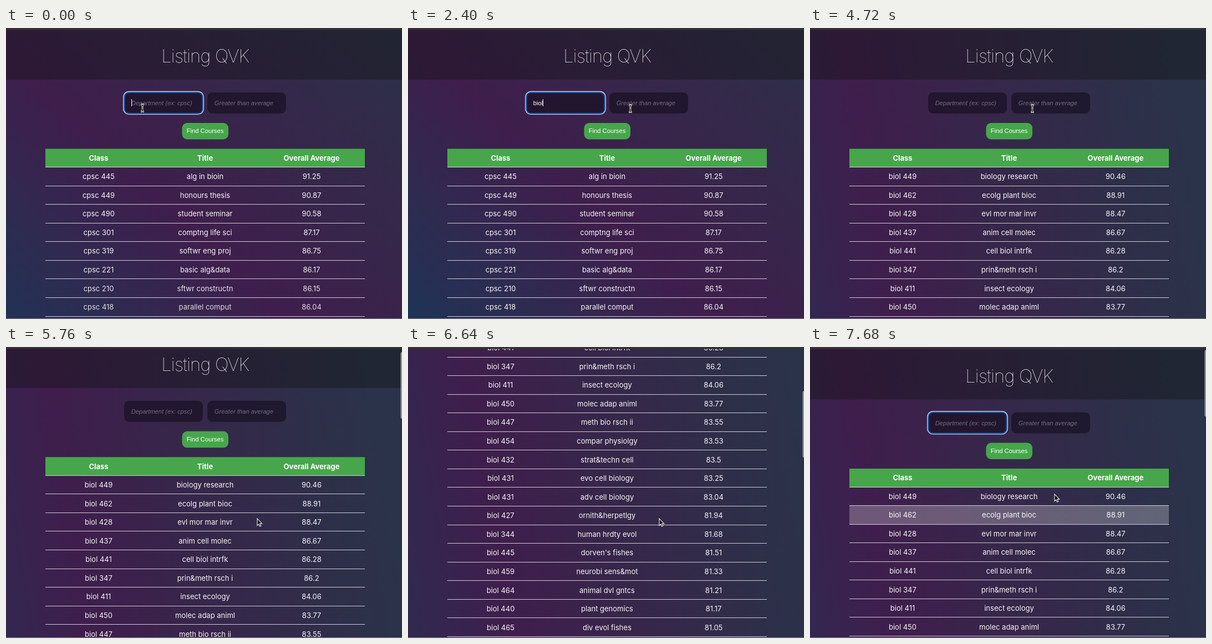
An HTML page with a canvas for the animation above (7.76 s loop, 714 by 524 pixels).

```html
<!DOCTYPE html>
<html lang="en">
<head>
<meta charset="utf-8">
<title>Course averages</title>
<style>
html, body { margin: 0; width: 100%; height: 100%; overflow: hidden; background: #2d2444; }
canvas { display: block; }
</style>
</head>
<body>
<canvas id="stage" width="714" height="524"></canvas>
<script>
const ctx = document.getElementById('stage').getContext('2d');
const W = 714, H = 524, LOOP = 7760, STEP = 80;
const SANS = 'Inter, Roboto, sans-serif';
const ARIAL = '"Liberation Sans", Arial, sans-serif';
const GREEN = '#47a64b';
const LEFT = 71, RIGHT = 647, COLS = [167, 359, 551];
const HEAD_Y = 217.5, ROWS_Y = 250.5, PITCH = 33.57;
const RESULTS_AT = 4240;

const parse = s => s.trim().split('\n').map(line => line.split('|'));
const cpsc = parse(`
cpsc 445|alg in bioin|91.25
cpsc 449|honours thesis|90.87
cpsc 490|student seminar|90.58
cpsc 301|comptng life sci|87.17
cpsc 319|softwr eng proj|86.75
cpsc 221|basic alg&data|86.17
cpsc 210|sftwr constructn|86.15
cpsc 418|parallel comput|86.04`);
const biol = parse(`
biol 449|biology research|90.46
biol 462|ecolg plant bioc|88.91
biol 428|evl mor mar invr|88.47
biol 437|anim cell molec|86.67
biol 441|cell biol intrfk|86.28
biol 347|prin&meth rsch i|86.2
biol 411|insect ecology|84.06
biol 450|molec adap animl|83.77
biol 447|meth bio rsch ii|83.55
biol 454|compar physiolgy|83.53
biol 432|strat&techn cell|83.5
biol 431|evo cell biology|83.25
biol 431|adv cell biology|83.04
biol 427|ornith&herpetlgy|81.94
biol 344|human hrdty evol|81.68
biol 445|dorven's fishes|81.51
biol 459|neurobi sens&mot|81.33
biol 464|animal dvl gntcs|81.21
biol 440|plant genomics|81.17
biol 465|div evol fishes|81.05
biol 301|biomathematics|81.04
biol 413|zoogeography|80.97
biol 417|phylogenetic bio|80.67
biol 415|evol procss plnt|80.65
biol 326|exp bio invertbr|80.61
biol 420|ocean cons&sustn|80.51`);

// Eased value through [time, value] points
function track(points, t) {
  if (t <= points[0][0]) return points[0][1];
  for (let i = 1; i < points.length; i++) {
    const [t0, a] = points[i - 1], [t1, b] = points[i];
    if (t <= t1) {
      const k = (t - t0) / (t1 - t0);
      return a + (b - a) * k * k * (3 - 2 * k);
    }
  }
  return points[points.length - 1][1];
}

const scrollAt = t => track([[5680, 0], [6240, 347], [6480, 360], [7080, 590], [7200, 590], [7600, 0], [7680, -1.5]], t);
const mouseX = t => track([[1840, 246], [2400, 401], [4880, 401], [5440, 453], [7520, 453], [7680, 441]], t);
const mouseY = t => track([[1840, 144], [2400, 145], [4880, 145], [5440, 309], [7520, 309], [7680, 265]], t);
const mouseShown = t => t < 720 || (t >= 1760 && t < 3040) || t >= 4400;

function text(str, x, y, font, color, align = 'center') {
  ctx.font = font;
  ctx.fillStyle = color;
  ctx.textAlign = align;
  ctx.fillText(str, x, y);
}

function box(x, y, w, h, r) {
  ctx.beginPath();
  ctx.roundRect(x, y, w, h, r);
}

function backdrop(t, scroll) {
  const early = t < RESULTS_AT;
  const [nx, ny] = early ? [0.68, -0.73] : [0.985, -0.17];
  const cx = early ? 225 + t * 0.018 : 105 + scroll * 0.1;
  const reach = 600;
  const g = ctx.createLinearGradient(cx - nx * reach, 262 - ny * reach, cx + nx * reach, 262 + ny * reach);
  g.addColorStop(0.16, '#1c3557');
  g.addColorStop(0.34, '#302a50');
  g.addColorStop(0.5, '#3f1e4c');
  g.addColorStop(0.7, '#36274a');
  g.addColorStop(0.98, '#2a3349');
  ctx.fillStyle = g;
  ctx.fillRect(0, 0, W, H);
}

function field(x, hint, value, focused, caret) {
  box(x, 116, 142, 38, 9);
  ctx.fillStyle = 'rgba(20,14,30,0.62)';
  ctx.fill();
  if (focused) {
    box(x + 0.5, 116, 141, 38, 8);
    ctx.strokeStyle = '#15509f';
    ctx.lineWidth = 2.4;
    ctx.stroke();
    box(x - 1.2, 114.3, 144.4, 41.2, 10);
    ctx.strokeStyle = '#dfe8f4';
    ctx.lineWidth = 1.2;
    ctx.stroke();
  }
  const left = x + 12.7;
  if (value) text(value, left, 139, '11.2px ' + ARIAL, '#fff', 'left');
  else text(hint, left, 139, 'italic 11.2px ' + ARIAL, '#746c7b', 'left');
  if (focused && caret) {
    const end = value ? ctx.measureText(value).width : 0;
    ctx.fillStyle = '#e8e8ee';
    ctx.fillRect(Math.round(left + end), 128, 1, 13);
  }
}

function form(t) {
  const count = t < 720 ? 0 : Math.min(4, 1 + Math.floor((t - 720) / 160));
  const sent = t >= RESULTS_AT;
  const first = t < 2480 || t >= 7440;
  const second = t >= 2480 && !sent;
  const typing = (t >= 720 && t < 1500) || (t >= 3040 && t < 3600);
  const caret = typing || t % 1000 < 520;
  field(213, 'Department (ex: cpsc)', sent ? '' : 'biol'.slice(0, count), first, caret);
  field(363, 'Greater than average', t >= 3040 && !sent ? '9' : '', second, caret);
  box(317.5, 171, 83.5, 29.5, 9);
  ctx.fillStyle = GREEN;
  ctx.fill();
  text('Find Courses', 359, 189.3, '11.2px ' + ARIAL, '#fff');
}

function table(t, scroll) {
  const rows = t < RESULTS_AT ? cpsc : biol;
  const hoverLive = (t >= 5000 && t < 5680) || t >= 7600;
  const hover = hoverLive ? Math.floor((mouseY(t - STEP) + scroll - ROWS_Y) / PITCH) : -1;
  ctx.fillStyle = GREEN;
  ctx.fillRect(LEFT, HEAD_Y, RIGHT - LEFT, ROWS_Y - HEAD_Y);
  ['Class', 'Title', 'Overall Average'].forEach((s, i) =>
    text(s, COLS[i], 238.8, '700 13px ' + SANS, '#fff'));
  rows.forEach((row, i) => {
    const y = ROWS_Y + i * PITCH;
    if (i === hover) {
      ctx.fillStyle = 'rgba(255,255,255,0.25)';
      ctx.fillRect(LEFT, y, RIGHT - LEFT, PITCH);
    }
    const dim = t < 1600 && i > 4 ? 0.98 - (i - 4) * 0.05 : 0.96;
    row.forEach((s, c) =>
      text(s, COLS[c], y + 21.7, '13px ' + SANS, `rgba(255,255,255,${dim})`));
  });
  ctx.fillStyle = 'rgba(235,232,240,0.85)';
  for (let i = 0; i <= rows.length; i++) {
    ctx.fillRect(LEFT, Math.round(ROWS_Y + i * PITCH - scroll - 0.5) + scroll, RIGHT - LEFT, 1);
  }
}

function heading() {
  ctx.fillStyle = 'rgba(16,16,18,0.38)';
  ctx.fillRect(0, 3, W, 90);
  ctx.letterSpacing = '-1px';
  text('Listing QVK', 359, 62, '100 33px ' + SANS, '#fff');
  ctx.letterSpacing = '0px';
}

function beam(x, y) {
  const line = () => {
    ctx.beginPath();
    ctx.moveTo(x - 3, y - 6.5);
    ctx.quadraticCurveTo(x, y - 6.5, x, y - 4);
    ctx.quadraticCurveTo(x, y - 6.5, x + 3, y - 6.5);
    ctx.moveTo(x, y - 5);
    ctx.lineTo(x, y + 5);
    ctx.moveTo(x - 3, y + 6.5);
    ctx.quadraticCurveTo(x, y + 6.5, x, y + 4);
    ctx.quadraticCurveTo(x, y + 6.5, x + 3, y + 6.5);
    ctx.moveTo(x - 1.5, y + 2.5);
    ctx.lineTo(x + 1.5, y + 2.5);
    ctx.stroke();
  };
  ctx.strokeStyle = '#fff';
  ctx.lineWidth = 2.8;
  line();
  ctx.strokeStyle = '#111';
  ctx.lineWidth = 1;
  line();
}

function arrow(x, y) {
  const shape = [[0, 0], [0, 12.5], [2.8, 9.9], [4.7, 14], [6.7, 13.1], [4.9, 9.1], [8.6, 8.9]];
  ctx.beginPath();
  shape.forEach(([dx, dy]) => ctx.lineTo(x + dx, y + dy));
  ctx.closePath();
  ctx.fillStyle = '#0c0c10';
  ctx.fill();
  ctx.strokeStyle = '#f2f2f4';
  ctx.lineWidth = 1.1;
  ctx.stroke();
}

function pointer(t) {
  if (!mouseShown(t)) return;
  const x = mouseX(t), y = mouseY(t);
  const inField = y > 116 && y < 154 && ((x > 213 && x < 355) || (x > 363 && x < 505));
  (inField ? beam : arrow)(x, y);
}

function draw(t) {
  const scroll = scrollAt(t);
  backdrop(t, scroll);
  ctx.save();
  ctx.translate(0, -scroll);
  heading();
  form(t);
  table(t, scroll);
  ctx.restore();
  if (t >= 5680) {
    box(711.5, 5.5 + scroll * 0.184, 5, 120, 2.5);
    ctx.fillStyle = 'rgba(190,190,198,0.75)';
    ctx.fill();
  }
  pointer(t);
  ctx.fillStyle = '#343336';
  ctx.fillRect(0, 0, W, 3.5);
  ctx.fillStyle = '#85828c';
  ctx.fillRect(0, 523, W, 1);
}

const start = performance.now();
function tick() {
  const t = (performance.now() - start) % LOOP;
  draw(Math.floor(t / STEP) * STEP);
  requestAnimationFrame(tick);
}
tick();
</script>
</body>
</html>
```
